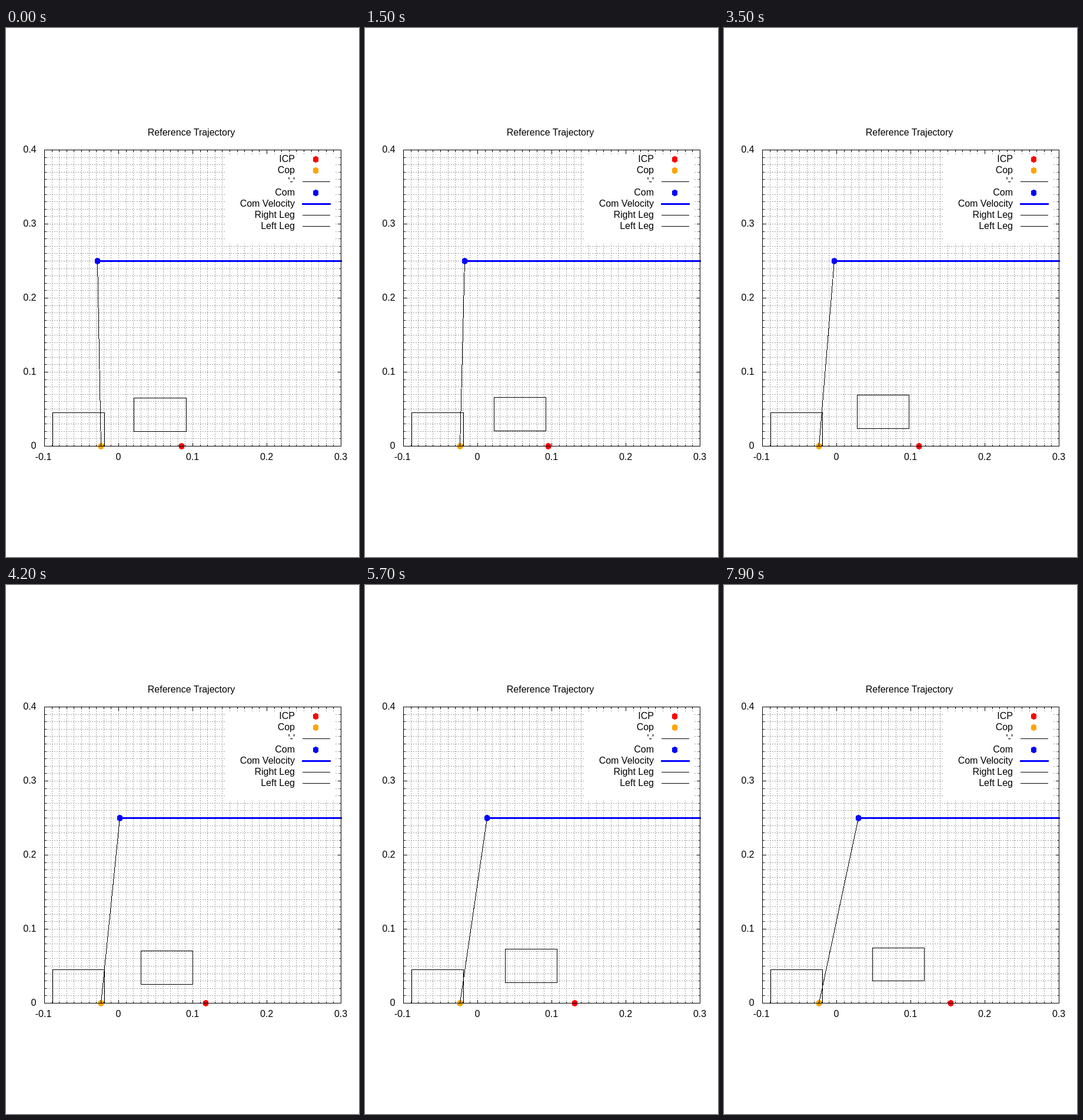
An HTML page that plays this animation: 600x900 px, repeating every 8 s.

```html
<!DOCTYPE html>
<html lang="en">
<head>
<meta charset="utf-8">
<title>Reference Trajectory</title>
<style>
  html, body { margin: 0; width: 100%; height: 100%; overflow: hidden; background: #fff; }
  svg { display: block; }
  path { fill: none; stroke: #000; shape-rendering: crispEdges; }
  text { font: 16px "Liberation Sans", Arial, sans-serif; fill: #000; }
</style>
</head>
<body>
<svg id="stage" width="600" height="900" viewBox="0 0 600 900"></svg>
<script>
const stage = document.getElementById('stage');
const LEFT = 65, RIGHT = 569, TOP = 207, BOTTOM = 711, UNIT = 1260;
const KEY = { x0: 372, x1: 559, y0: 214, y1: 366 };
const STEP = 100, STEPS = 80;

function add(tag, attrs, content = '') {
  const el = document.createElementNS('http://www.w3.org/2000/svg', tag);
  for (const k in attrs) el.setAttribute(k, attrs[k]);
  el.textContent = content;
  return stage.appendChild(el);
}
// Shifting by half a pixel puts one-pixel strokes on whole pixels.
const path = (d, attrs = {}) => add('path', { d, transform: 'translate(.5 .5)', ...attrs });
const label = (s, x, y, anchor) => add('text', { x, y, 'text-anchor': anchor }, s);
const hline = (x0, x1, y) => `M${x0} ${y}H${x1}`;
const vline = (x, y0, y1) => `M${x} ${y0}V${y1}`;
const box = (x0, y0, x1, y1) => `M${x0} ${y0}H${x1}V${y1}H${x0}Z`;

// Marker built from pixel rows, half-widths from the middle outwards.
const DOT = [4, 4, 4, 4, 3, 1].map((w, i) =>
  [i, -i].map(y => `M${-w} ${y}h${2 * w + 1}v1h${-2 * w - 1}z`).join('')).join('');
const dot = color => add('path', { d: DOT, style: `fill:${color};stroke:none` });
const place = (el, x, y) => el.setAttribute('transform', `translate(${x} ${y})`);

function drawGrid() {
  let grid = '', ticks = '';
  for (let i = 0; i <= 40; i++) {
    const x = Math.round(LEFT + i * 12.6), y = Math.round(BOTTOM - i * 12.6);
    const len = i % 10 ? 3 : 6;
    if (i > 0 && i < 40) {
      grid += x > KEY.x0 && x < KEY.x1
        ? vline(x, BOTTOM, KEY.y1) + vline(x, KEY.y0, TOP)
        : vline(x, BOTTOM, TOP);
      grid += y > KEY.y0 && y < KEY.y1
        ? hline(LEFT, KEY.x0, y) + hline(KEY.x1, RIGHT, y)
        : hline(LEFT, RIGHT, y);
    }
    ticks += vline(x, BOTTOM, BOTTOM - len) + vline(x, TOP, TOP + len)
      + hline(LEFT, LEFT + len, y) + hline(RIGHT, RIGHT - len, y);
  }
  path(grid, { style: 'stroke:#a0a0a0', 'stroke-dasharray': '2 2' });
  path(ticks);
}

function drawLabels() {
  label('Reference Trajectory', 315, 183, 'middle');
  ['-0.1', '0', '0.1', '0.2', '0.3'].forEach((s, i) =>
    label(s, i ? LEFT + i * 126 : 63.5, 735, 'middle'));
  ['0', '0.1', '0.2', '0.3', '0.4'].forEach((s, i) =>
    label(s, 51.5, 716 - i * 126, 'end'));
}

function drawKey() {
  const rows = [['ICP', 'red'], ['Cop', 'orange'], ["'-'"], ['Com', 'blue'],
    ['Com Velocity'], ['Right Leg'], ['Left Leg']];
  rows.forEach(([name, color], i) => {
    const y = 223 + i * 19;
    label(name, 491, y + 5, 'end');
    if (color) place(dot(color), 526, y);
    else if (i === 4) path(hline(502, 551, y), { style: 'stroke:#00f;stroke-width:3' });
    else path(hline(503, 550, y));
  });
}

drawGrid();
drawLabels();
drawKey();

const COP = 161, COM_Y = 396, FOOT_W = 0.07 * UNIT, FOOT_H = 0.045 * UNIT;
const icp = dot('red');
place(dot('orange'), COP, BOTTOM);
const leg = path('');
const com = dot('blue');
const velocity = path('', { style: 'stroke:#00f;stroke-width:3' });
path(box(79, 654, 167, BOTTOM));
const foot = path('');
path(box(LEFT, TOP, RIGHT, BOTTOM));

// Inverted pendulum: 0.25 m high, one millisecond per step.
const OMEGA = Math.sqrt(9.81 / 0.25) / 1000;

function pose(n) {
  const grow = Math.exp(OMEGA * n);
  const icpX = Math.round(COP + 136.6 * grow);
  const comX = Math.round(COP + 68.3 * grow - 74 / grow);
  place(icp, icpX, BOTTOM);
  place(com, comX, COM_Y);
  leg.setAttribute('d', `M${comX} ${COM_Y}L${COP} ${BOTTOM}`);
  velocity.setAttribute('d', hline(comX, 570, COM_Y));

  const u = Math.min(1, n / 79.5);
  const x = 217.33 + 0.03 * n + 0.0069 * n * n - 2.13e-5 * n ** 3;
  const y = 685.8 - 0.01 * UNIT * u * u * (3 - 2 * u);
  foot.setAttribute('d', box(...[x, y - FOOT_H, x + FOOT_W, y].map(Math.round)));
}

const start = performance.now();
function tick() {
  pose(Math.floor((performance.now() - start) / STEP) % STEPS);
  requestAnimationFrame(tick);
}
tick();
</script>
</body>
</html>
```
